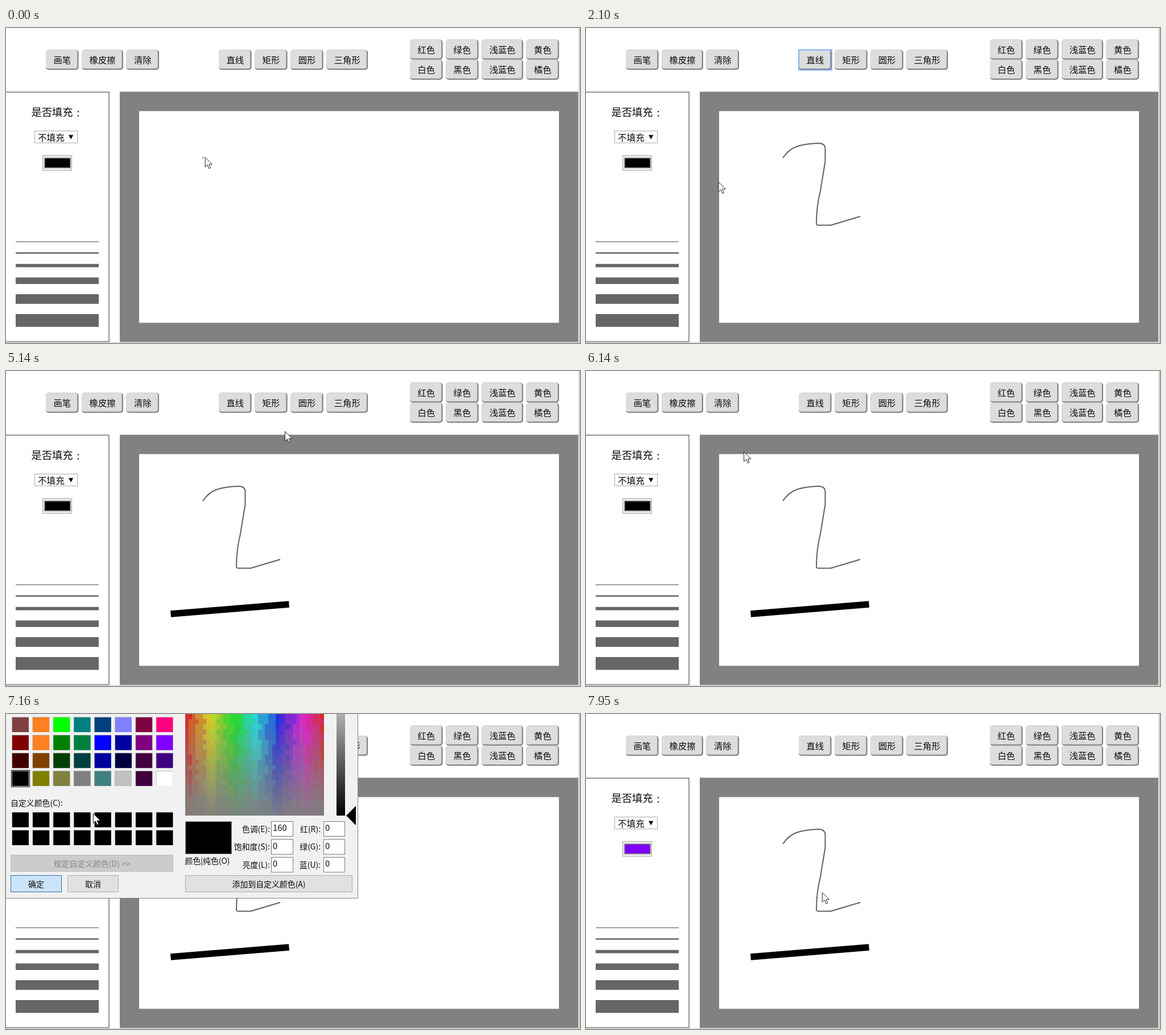
An HTML page for the animation above (8 s loop, 1009x555 px).

```html
<!DOCTYPE html>
<html lang="zh-CN">
<head>
<meta charset="utf-8">
<title>画板</title>
<style>
html, body { margin: 0; width: 100%; height: 100%; overflow: hidden; background: #fff; }
svg { display: block; width: 1009px; height: 555px; }
text { font-family: "Noto Sans CJK SC", "Noto Sans CJK", "Noto Sans", sans-serif; fill: #0c0c0c; }
</style>
</head>
<body>
<svg id="stage" viewBox="0 0 1009 555" xmlns="http://www.w3.org/2000/svg">
  <defs>
    <linearGradient id="lumPurple" gradientUnits="userSpaceOnUse" x1="0" y1="-82" x2="0" y2="179">
      <stop offset="0" stop-color="#fff"/><stop offset=".5" stop-color="#8000ff"/><stop offset="1"/>
    </linearGradient>
    <linearGradient id="lumGray" gradientUnits="userSpaceOnUse" x1="0" y1="-82" x2="0" y2="179">
      <stop offset="0" stop-color="#fff"/><stop offset="1"/>
    </linearGradient>
  </defs>
  <g id="page"></g>
  <path id="stroke" fill="none" stroke="#616161" stroke-width="2" stroke-linejoin="round"
    d="M346 229Q356 214 370 209T408 203Q420 203 420.500 212V235L412 287Q405 315 405 345Q405 348 412 347.500H430L482 332"/>
  <path id="line" d="M289.500 428L497.500 411" stroke="#000" stroke-width="11.500"/>
  <g id="dialog"></g>
  <path id="cursor" d="M.5.500V17.500L4.500 13.800L7.200 20.300L9.900 19.200L7.200 12.900H12.800Z" fill="#fff" stroke="#222"/>
</svg>
<script>
const $ = id => document.getElementById(id);
const LOOP = 8000, STEP = 77;

function add(parent, tag, attrs) {
  const node = document.createElementNS("http://www.w3.org/2000/svg", tag);
  for (const key in attrs) node.setAttribute(key, attrs[key]);
  return parent.appendChild(node);
}
const rect = (parent, x, y, width, height, fill, more) =>
  add(parent, "rect", { x, y, width, height, fill, ...more });
function label(parent, str, x, cy, size, anchor = "start") {
  const node = add(parent, "text", { x, y: cy + size * .37, "font-size": size, "text-anchor": anchor });
  node.textContent = str;
  return node;
}
const show = (node, on) => node.setAttribute("visibility", on ? "inherit" : "hidden");

// Page
const page = $("page");

function button(str, x, y) {
  const w = str.length * 15.3 + 27, h = 35.2;
  rect(page, x, y, w, h, "#858585", { rx: 5 });
  rect(page, x, y, w - 2.3, h - 2.3, "#ddd", { rx: 4 });
  label(page, str, x + w / 2, y + 17.8, 15.3, "middle");
  return x + w + 5.5;
}
function buttonRow(names, x, y) {
  names.split(" ").forEach(name => { x = button(name, x, y); });
}
buttonRow("画笔 橡皮擦 清除", 70, 38.5);
buttonRow("直线 矩形 圆形 三角形", 374, 38.5);
buttonRow("红色 绿色 浅蓝色 黄色", 710, 20.5);
buttonRow("白色 黑色 浅蓝色 橘色", 710, 56);

const ring = x => rect(page, x, 38.5, 58, 35.5, "none", { stroke: "#5b98f5", "stroke-width": 1.4 });
const lineRing = ring(374), boxRing = ring(437.5);

rect(page, -5, 113, 186, 439.5, "none", { stroke: "#7c7c7c", "stroke-width": 1.6 });
rect(page, 200, 112.3, 806, 441, "#808180");
rect(page, 234, 146.4, 738, 373, "#fff");
rect(page, 1007, 0, 1.3, 555, "#a9a9a9");
rect(page, 0, 554, 1009, 1, "#c9c9c4");

label(page, "是否填充", 44.5, 148.5, 18.3);
label(page, ":", 124.5, 149.5, 18.3);
rect(page, 50.5, 181.5, 75, 21, "#fff", { stroke: "#a9a9a9" });
label(page, "不填充", 56, 193.5, 15.6);
add(page, "path", { d: "M110 188.500H118.300L114.150 196Z" });
const well = rect(page, 64.5, 224.5, 51, 26.5, "#ececec", { stroke: "#a9a9a9" });
const swatch = rect(page, 68, 229.2, 45, 17, "#000", { stroke: "#777", "stroke-width": 1.5 });

const glow = rect(page, 14.5, 437, 151, 16.5, "#666", { rx: 2, opacity: .3 });
let barY = 376;
for (const h of [1.2, 2.5, 5.8, 11.5, 17, 22.6]) {
  rect(page, 17, barY, 146, h, "#666");
  barY += h + 18;
}

// Colour dialog
const dialog = $("dialog");
rect(dialog, -2, -2, 620.5, 326.5, "#f0f1f0", { stroke: "#858585" });

const cellX = col => 11 + col * 36.2, cellY = row => 6 + row * 31.6;
function cell(x, y, fill) {
  rect(dialog, x - .7, y - .7, 30.5, 27.5, "#fafafa");
  rect(dialog, x - .7, y - .7, 29.7, 26.7, "#a4a4a4");
  rect(dialog, x, y, 29, 26, fill);
}
// One hex digit per channel, in sixteenths; f is full
const shade = code => `rgb(${[...code].map(d => d === "f" ? 255 : parseInt(d, 16) * 16)})`;
[
  "844 f82 0f0 088 048 88f 804 f08",
  "800 f82 080 084 00f 00a 808 80f",
  "400 840 040 044 00a 004 404 408",
  "000 880 884 888 488 ccc 404 fff"
].forEach((row, r) => row.split(" ").forEach((code, c) => cell(cellX(c), cellY(r), shade(code))));
for (let i = 0; i < 16; i++) cell(cellX(i % 8), 173.5 + (i >> 3) * 31.6, "#000");
const pick = rect(dialog, 0, 0, 32, 29, "none", { stroke: "#000" });

// Spectrum: hue bands with ragged edges, fading to grey
let seed = 7;
const random = () => (seed = seed * 16807 % 2147483647) / 2147483647;
const snap = (value, unit) => Math.round(value / unit) * unit;
const CW = 6.1, CH = 8.95;
for (let c = 0; c < 40; c++) {
  const lag = random() * .16 - .08;
  for (let r = 0; r < 20; r++) {
    const hue = snap(c * 9 + random() * 8 - 4, 18);
    const sat = 70 * snap(1 - (r + .5) / 20 + lag, .1);
    rect(dialog, 315 + c * CW, r * CH, CW, CH, `hsl(${hue},${Math.max(sat, 3)}%,50%)`,
      { "shape-rendering": "crispEdges" });
  }
}
const marker = rect(dialog, 392, 12.5, 4.5, 9.5, "#fff");
const lumBar = rect(dialog, 581, 0, 15, 179, "");
const lumArrow = add(dialog, "path", { d: "M598 0L615 -17V17Z" });

const SIZE = 13.9;
label(dialog, "自定义颜色(C):", 8, 157, SIZE);
label(dialog, "颜色|纯色(O)", 314.5, 259, SIZE);
const preview = rect(dialog, 315.5, 189.5, 81, 57, "", { stroke: "#8a8a8a" });

function dialogButton(str, x, y, w, fill, edge, ink = "#0c0c0c") {
  rect(dialog, x + .5, y + .5, w - 1, 29, fill, { stroke: edge });
  label(dialog, str, x + w / 2, y + 15.5, SIZE, "middle").style.fill = ink;
}
dialogButton("规定自定义颜色(D) >>", 8, 248, 286, "#ccc", "#bfbfbf", "#858585");
dialogButton("取消", 108, 284, 90, "#e1e1e1", "#adadad");
dialogButton("添加到自定义颜色(A)", 315, 284, 294, "#e1e1e1", "#adadad");
dialogButton("确定", 8, 284, 90, "#cce4f7", "#2c6fa8");

function field(name, right, x, w, row) {
  const y = 189 + row * 31.6;
  label(dialog, name, right, y + 13.5, SIZE, "end");
  rect(dialog, x + .5, y + .5, w, 26, "#fff", { stroke: "#7a7a7a" });
  return label(dialog, "", x + 3, y + 11.5, 14.8);
}
const fields = [
  ...["色调(E):", "饱和度(S):", "亮度(L):"].map((s, i) => field(s, 464, 466, 38, i)),
  ...["红(R):", "绿(G):", "蓝(U):"].map((s, i) => field(s, 553, 558, 37, i))
];

function setPicked(on) {
  const values = on ? [180, 240, 120, 128, 0, 255] : [160, 0, 0, 0, 0, 0];
  fields.forEach((f, i) => { f.textContent = values[i]; });
  preview.setAttribute("fill", on ? "#8000ff" : "#000");
  lumBar.setAttribute("fill", on ? "url(#lumPurple)" : "url(#lumGray)");
  lumArrow.setAttribute("transform", `translate(0 ${on ? 48 : 179})`);
  pick.setAttribute("x", cellX(on ? 7 : 0) - 1.5);
  pick.setAttribute("y", cellY(on ? 1 : 3) - 1.5);
  show(marker, on);
}

// Pointer moves after the pen stroke: start and end time, end point
const moves = [
  [870, 1250, 390, 85],
  [1330, 1410, 398, 63],
  [1950, 2095, 232.5, 271],
  [2175, 2710, 145, 441],
  [2790, 2790, 139, 443],
  [3420, 3810, 290.5, 430.5],
  [4130, 4590, 500, 411],
  [4910, 5135, 490, 106],
  [5215, 5450, 467, 52],
  [5980, 6440, 24, 262],
  [6520, 6750, 90, 240],
  [7160, 7320, 279, 45],
  [7470, 7560, 85, 287.5],
  [7720, 7720, 109, 291],
  [7800, 7945, 414.8, 314]
];

// Share of a move that is done, in hard steps
function progress(t, start, end) {
  if (t < start) return 0;
  if (t >= end) return 1;
  const gaps = Math.max(1, Math.round((end - start) / STEP));
  return (Math.floor((t - start) / (end - start) * gaps + .1) + 1) / (gaps + 1);
}

const stroke = $("stroke"), strokeLength = stroke.getTotalLength();

function pointer(t, drawn) {
  const tip = stroke.getPointAtLength(drawn);
  let x = tip.x + 2.5, y = tip.y;
  for (const [start, end, toX, toY] of moves) {
    const f = progress(t, start, end);
    x += (toX - x) * f;
    y += (toY - y) * f;
  }
  return [x, y];
}

function render(t) {
  const within = (from, to) => t >= from && t < to;
  const drawn = Math.max(2, strokeLength * progress(t, 80, 700));
  stroke.setAttribute("stroke-dasharray", `${drawn} ${strokeLength + 9}`);
  show($("line"), t >= 4590);
  show(lineRing, within(1790, 3030));
  show(boxRing, within(5680, 5750));
  show(glow, within(2560, 3420));
  show(dialog, within(7160, 7640));
  setPicked(t >= 7400);
  well.setAttribute("stroke", within(6990, 7640) ? "#777" : "#a9a9a9");
  swatch.setAttribute("fill", t >= 7640 ? "#8000ff" : "#000");
  $("cursor").setAttribute("transform", `translate(${pointer(t, drawn)})`);
}

const begin = performance.now();
function tick() {
  render((performance.now() - begin) % LOOP);
  requestAnimationFrame(tick);
}
tick();
</script>
</body>
</html>
```
